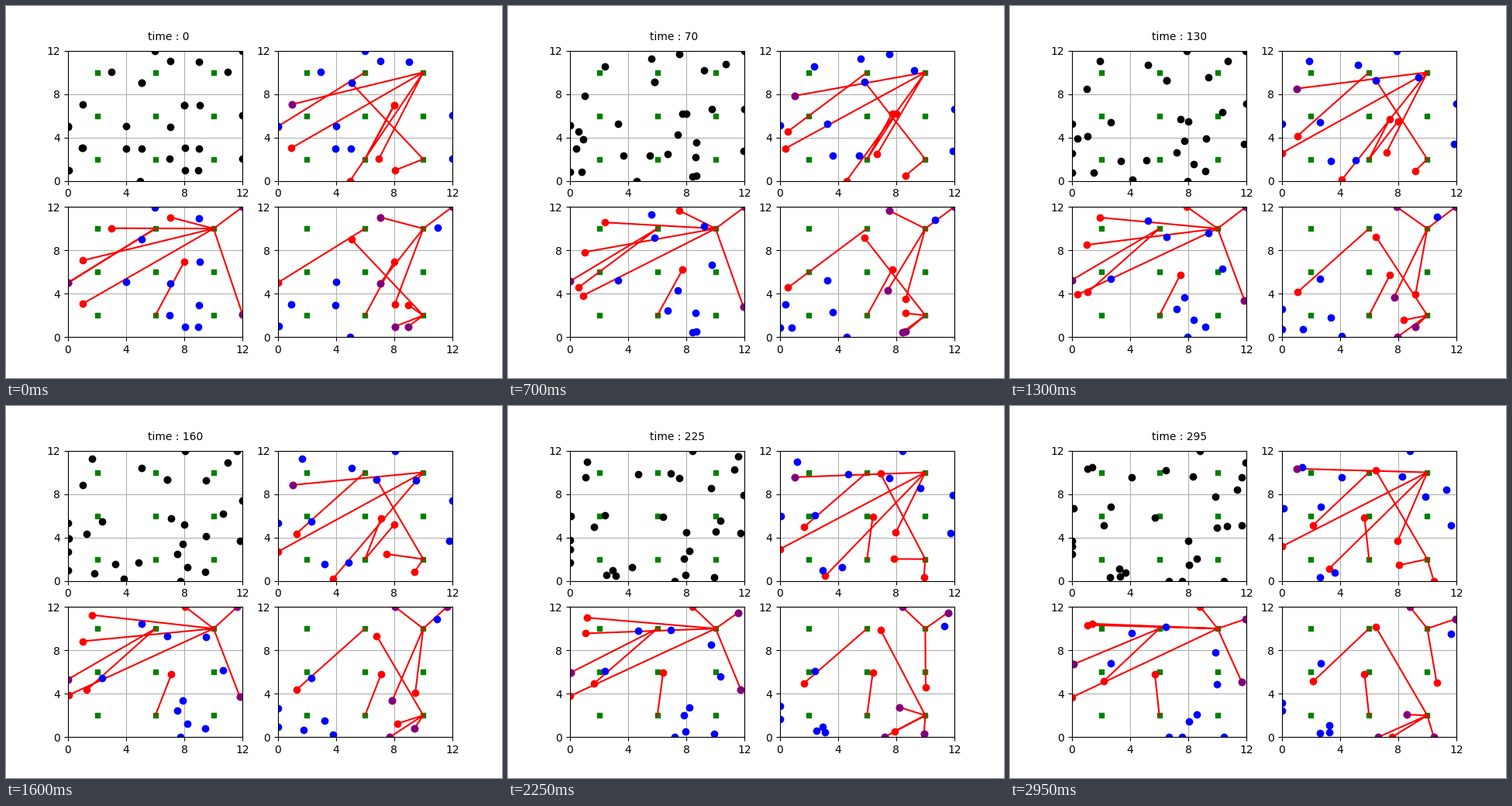
These frames come from a looping animation (640x480 px, 3000 ms). A matplotlib script:

```python
import numpy as np
import matplotlib.pyplot as plt
from matplotlib.animation import FuncAnimation

SIZE = 12          # side of the square area
FRAMES = 60
TICK = 5           # simulated time per frame
STEP = TICK / 90   # distance a car drives per frame

# start x, start y, first heading in degrees
CARS = {
    "A": (1, 7, 89), "B": (0, 5, 180), "C": (1, 3, 146), "D": (8, 7, -109.5),
    "E": (7, 2, 155), "F": (8, 1, -38), "G": (5, 0, -120), "H": (5, 9, 10),
    "I": (6, 12, -121), "J": (7, 11, 52), "K": (9, 11, -75), "L": (3, 10, 137),
    "M": (4, 5, 90), "N": (4, 3, -117.5), "O": (5, 3, -55), "P": (12, 6, 49),
    "Q": (12, 2, 96.5), "R": (0, 5, 170), "S": (5, 9, 10), "T": (1, 3, 97),
    "U": (12, 12, 45), "V": (7, 5, -61.5), "W": (9, 7, -27), "X": (9, 3, -114),
    "Y": (9, 1, -135), "Z": (8, 3, 37.5), "a": (11, 10, 113), "b": (0, 1, 190),
    "c": (0, 1, -10), "d": (8, 7, -90.5),
}

# (step, new heading)
TURNS = {
    "B": [(2, -38.5), (28, 58), (54, -32)],
    "C": [(9, -122), (25, 161)],
    "D": [(25, 168), (54, -145)],
    "E": [(10, 48), (22, -25), (41, -106), (53, -32)],
    "F": [(15, 40), (29, -46)],
    "G": [(22, 160), (48, 70)],
    "H": [(36, 95), (52, 186)],
    "I": [(53, 168)],
    "J": [(22, 60)],
    "L": [(37, -127), (51, -42)],
    "M": [(2, 168), (35, 71)],
    "O": [(17, -142)],
    "P": [(44, 140)],
    "R": [(35, 85)],
    "T": [(18, -172)],
    "U": [(26, 165), (33, -122), (42, -28), (52, -80)],
    "W": [(34, -121)],
    "a": [(23, -34), (33, -63)],
    "b": [(29, 95)],
}
PACE = {"N": 0.9, "Q": 0.94, "X": 1.05}

N, NE, S, SE = (6, 10), (10, 10), (6, 2), (10, 2)

# linked cars per station, cars that relay, idle cars, station changes by time
PANELS = [
    dict(links={N: "B", NE: "ACEG", S: "Dd", SE: "FH"}, relay="A",
         idle="IJKLMNOPQRS", moves={"E": (135, SE), "d": (180, NE)}),
    dict(links={N: "BR", NE: "AJLTUQ", S: "D"}, relay="UQR",
         idle="IKHMVWXEFY", moves={}),
    dict(links={N: "B", NE: "JUVZ", S: "D", SE: "HXFY"}, relay="JUVFY",
         idle="aMCNbcG", moves={"V": (180, SE)}),
]


def drive(name):
    """Positions after every step; cars slide along the border."""
    x, y, heading = CARS[name]
    turns = dict(TURNS.get(name, []))
    pos = np.array([x, y], float)
    track = []
    for i in range(FRAMES):
        heading = turns.get(i, heading)
        a = np.radians(heading)
        move = STEP * PACE.get(name, 1) * np.array([np.cos(a), np.sin(a)])
        pos = np.clip(pos + move, 0, SIZE)
        track.append(pos)
    return np.array(track)


TRACKS = {name: drive(name) for name in CARS}

fig, axes = plt.subplots(2, 2, figsize=(6.4, 4.8), dpi=100)
overview, *views = axes.flat

for ax in axes.flat:
    ax.set(xlim=(0, SIZE), ylim=(0, SIZE),
           xticks=range(0, SIZE + 1, 4), yticks=range(0, SIZE + 1, 4))
    ax.grid(True)
    gx, gy = np.meshgrid([2, 6, 10], [2, 6, 10])
    ax.plot(gx.ravel(), gy.ravel(), "s", color="green", ms=4)


def dots(ax, color):
    return ax.plot([], [], "o", color=color)[0]


def place(artist, names, k):
    artist.set_data(*np.array([TRACKS[n][k] for n in names]).T)


label = overview.text(5.5, 13, "")
everyone = dots(overview, "black")
layers = [(ax.plot([], [], color="red", lw=1.5)[0], dots(ax, "red"),
           dots(ax, "blue"), dots(ax, "purple")) for ax in views]


def update(k):
    time = k * TICK
    label.set_text(f"time : {time}")
    place(everyone, CARS, k)
    for panel, (lines, linked, idle, relay) in zip(PANELS, layers):
        points = []
        for station, names in panel["links"].items():
            for n in names:
                since, other = panel["moves"].get(n, (np.inf, None))
                goal = other if time >= since else station
                points += [TRACKS[n][k], goal, (np.nan, np.nan)]
        lines.set_data(*np.array(points).T)
        place(linked, "".join(panel["links"].values()), k)
        place(idle, panel["idle"], k)
        place(relay, panel["relay"], k)
    return []


anim = FuncAnimation(fig, update, frames=FRAMES, interval=50,
                     repeat=True, repeat_delay=0)
plt.show()
```
